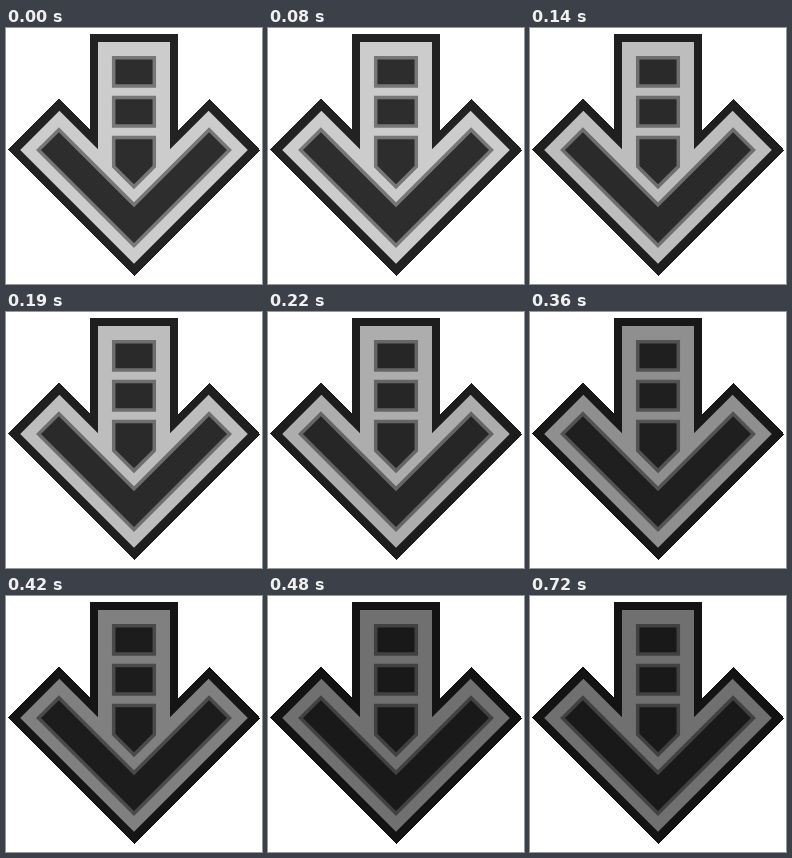
These frames come from a looping animation (256x256 px, 0.88 s). An HTML page:

```html
<!DOCTYPE html>
<html lang="en">
<head>
<meta charset="utf-8">
<title>Down arrow</title>
<style>
  html, body { margin: 0; width: 100%; height: 100%; overflow: hidden; background: #fff; }
  svg { display: block; width: 100vw; height: 100vh; }
  .rim { fill: var(--rim); shape-rendering: crispEdges; }
  .plate { fill: var(--plate); }
  .inlay { fill: var(--inlay); stroke: var(--edge); stroke-width: 3.5; }
</style>
</head>
<body>
<svg id="arrow" viewBox="0 0 256 256">
  <path class="rim" d="M84 6H172V102L203.5 70.5L254 122L128 248L2 122L52.5 70.5L84 102Z"/>
  <path class="plate" d="M92 14H164V121.3L202.6 82.7L241.8 122L128 235.8L14.2 122L53.4 82.7L92 121.3Z"/>
  <g class="inlay">
    <path d="M107.7 29.8H148.3V58H107.7Z"/>
    <path d="M107.7 69.6H148.3V98H107.7Z"/>
    <path d="M107.7 109.6H148.3V138.5L128 158.8L107.7 138.5Z"/>
    <path d="M52.9 101.7L128 176.8L203.1 101.7L223.5 122L128 217.5L32.5 122Z"/>
  </g>
</svg>
<script>
  const LOOP = 880;
  const DIM_TIMES = [140, 220, 280, 360, 420, 480];
  const DIM_STEP = 0.075;
  const GRAYS = { rim: 34, plate: 204, inlay: 45, edge: 119 };
  const arrow = document.getElementById("arrow");

  function render(time) {
    const steps = DIM_TIMES.filter(start => time >= start).length;
    const light = 1 - steps * DIM_STEP;
    for (const [name, gray] of Object.entries(GRAYS)) {
      const value = Math.round(gray * light);
      arrow.style.setProperty("--" + name, `rgb(${value}, ${value}, ${value})`);
    }
  }

  const start = performance.now();
  function tick() {
    render((performance.now() - start) % LOOP);
    requestAnimationFrame(tick);
  }
  tick();
</script>
</body>
</html>
```
